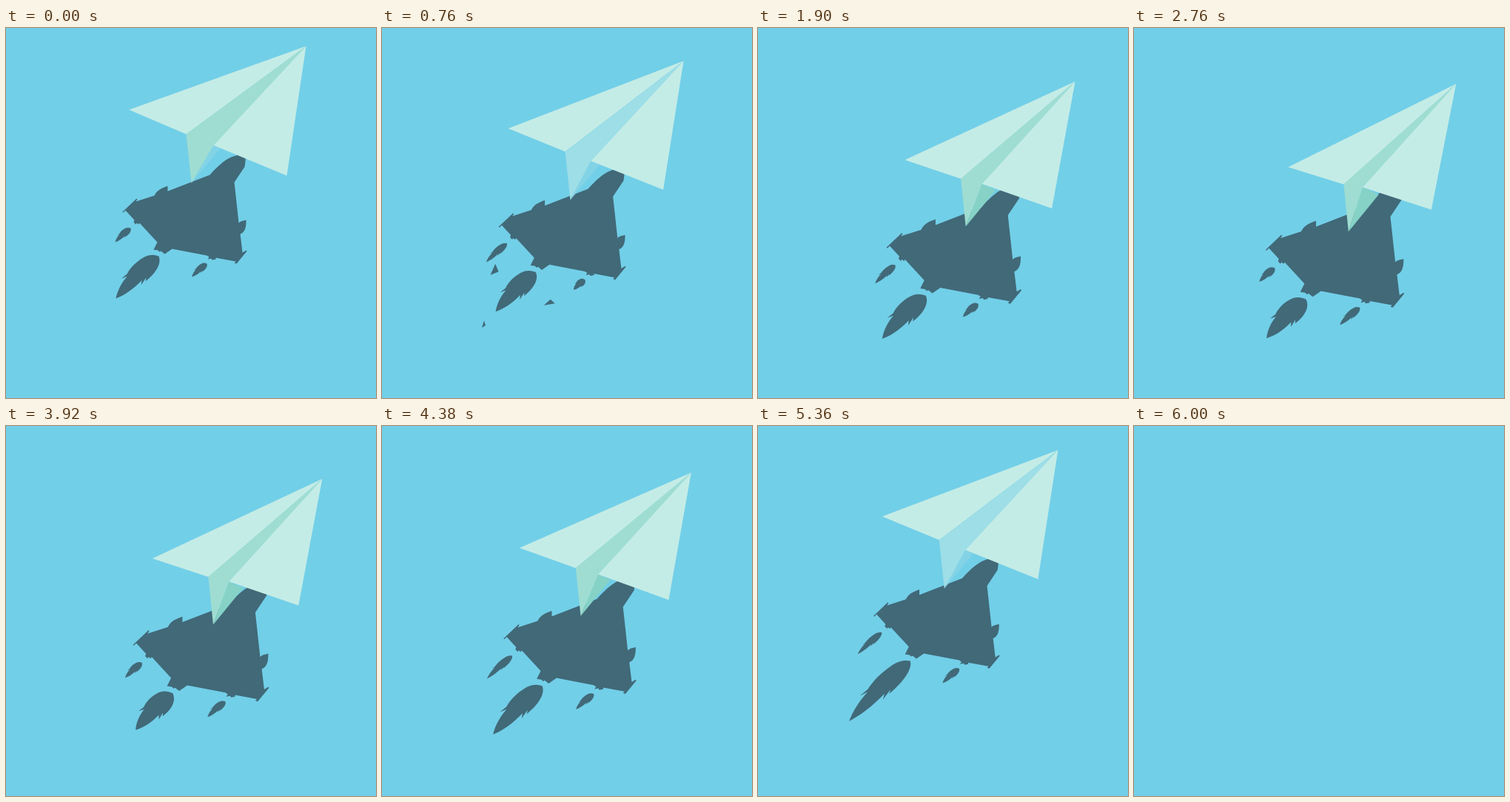
Recreate the animation shown at these times as an HTML page. Size 500 by 500 pixels, loop 6020 ms.

```html
<!DOCTYPE html>
<html lang="en">
<head>
<meta charset="utf-8">
<title>Paper plane</title>
<style>
  html, body { margin: 0; width: 100%; height: 100%; overflow: hidden; background: #72cfe8; }
  svg { display: block; width: 100vw; height: 100vh; }
</style>
</head>
<body>
<svg viewBox="0 0 500 500">
  <g id="scene">
    <g id="shadow" fill="#416978">
      <path id="ship" d="M0 0 L19 -18 L20 -17 L18 -14 L43 -22 C47 -30 53 -32 61 -35 L61 -28
        L118 -50 C132 -65 145 -78 165 -77 C167 -74 166 -68 165 -61 L151 -40 L157 15
        C160 12 163 12 167 11 C167 20 166 27 159 30 L162 55 L167 52 L168 53 L154 70 L151 69 L153 67
        L126 62 L126 64 L121 65 L120 63 L115 64 L117 61 L114 59 L67 50 L57 57 L52 53 L50 54 L48 52
        L42 51 L47 41 L23 15 L22 17 L19 15 L18 17 L15 14 L16 11 L4 -2 L1 1 Z"/>
    </g>
    <g id="debris" fill="#416978"></g>
    <polygon id="farKeel"/>
    <polygon id="leftWing" fill="#c4ece6"/>
    <polygon id="keel"/>
    <polygon id="rightWing" fill="#c4ece6"/>
  </g>
</svg>
<script>
const LOOP = 6020, BLANK_AT = 6000;
const FLAME = 'M0 0 C3 7 9 12 17 13.5 C27 16 38 16 47 13 L57 14 L49 10.5 C60 10 72 6 81 0 C70 -5 56 -7.5 39 -7 L44 -11 L32 -8.5 L36 -11.5 C24 -13 5 -12 0 0Z';
const FLAME_LENGTH = 81;
const { cos, sin, PI } = Math;
const $ = id => document.getElementById(id);

function add(parent, tag, attrs) {
  const node = document.createElementNS('http://www.w3.org/2000/svg', tag);
  for (const key in attrs) node.setAttribute(key, attrs[key]);
  return parent.appendChild(node);
}

// Paper corners relative to the nose: x, y, then their drift as the plane rolls.
const corners = {
  nose: [0, 0, 0, 0],
  left: [-239.3, 86, 12.5, 27],
  fold: [-162, 119, 10.3, 17],
  keelTip: [-155, 185, 9.7, 15],
  joint: [-125, 134, -1.2, 6],
  far: [-116, 138, 11.5, 12],
  right: [-26, 175, -7.5, -5]
};
const faces = {
  farKeel: ['joint', 'far', 'keelTip'],
  leftWing: ['left', 'nose', 'fold'],
  keel: ['fold', 'nose', 'joint', 'keelTip'],
  rightWing: ['joint', 'nose', 'right']
};

const flameTimes = [0, 760, 1900, 2760, 3920, 4800, 6000];
const flames = [
  { x: 11, y: 22, angle: 138, width: .36, wave: 5, sway: 4, lengths: [28, 37, 34, 25, 28, 49, 28] },
  { x: 49, y: 60, angle: 135.5, width: 1, wave: 6, sway: 17, lengths: [81, 74, 76, 67, 64, 121, 84] },
  { x: 114, y: 70, angle: 139, width: .36, wave: 7, sway: 4, lengths: [27, 20, 25, 32, 29, 37, 27] }
];
for (const flame of flames) flame.node = add($('shadow'), 'path', { d: FLAME });

// Birth time, position, width, height.
const sparks = [
  [720, 158, 321, 11, 15], [700, 235, 363, 15, 8], [640, 155, 385, 5, 10],
  [960, 142, 396, 12, 13], [1140, 146, 407, 11, 14], [1300, 148, 413, 10, 12]
].map(([birth, x, y, w, h]) => ({
  birth, x, y,
  node: add($('debris'), 'path', { d: `M${w * .1} ${-h / 2} L${w / 2} ${h * .2} L${-w / 2} ${h / 2}Z` })
}));

// Eases between the key lengths; the flicker dies out at each key.
function flameLength({ lengths, wave, sway }, t) {
  let i = 0;
  while (i < flameTimes.length - 2 && t >= flameTimes[i + 1]) i++;
  const f = (t - flameTimes[i]) / (flameTimes[i + 1] - flameTimes[i]);
  const ease = (1 - cos(PI * f)) / 2;
  return lengths[i] + (lengths[i + 1] - lengths[i]) * ease + sway * sin(PI * wave * f);
}

function draw(t) {
  $('scene').style.display = t < BLANK_AT ? '' : 'none';
  const a = t / 1000 + .27;
  const roll = (1 - cos(t / 1000 + .155)) / 2;
  const noseX = 418.5 - 16.4 * cos(a) + 2 * cos(2 * a) + 1.6 * cos(3 * a);
  const noseY = 55.2 - 26.4 * cos(a) - 6.2 * cos(2 * a);

  for (const id in faces) {
    const points = faces[id].map(name => {
      const [x, y, dx, dy] = corners[name];
      return [noseX + x + dx * roll, noseY + y + dy * roll].map(v => v.toFixed(2)).join();
    });
    $(id).setAttribute('points', points.join(' '));
  }
  const tinted = roll > .08 && roll < .5;
  $('keel').setAttribute('fill', tinted ? '#9ddee7' : '#9fddd2');
  $('farKeel').setAttribute('fill', roll < .5 ? '#83d3e6' : '#86d2c7');

  $('shadow').setAttribute('transform',
    `translate(${noseX - 248 - 9.5 * roll} ${noseY + 224 + .3 * roll}) scale(${1 + .118 * roll})`);
  for (const flame of flames) {
    const stretch = flameLength(flame, t) / FLAME_LENGTH;
    flame.node.setAttribute('transform',
      `translate(${flame.x} ${flame.y}) rotate(${flame.angle}) scale(${stretch} ${flame.width})`);
  }
  for (const { birth, x, y, node } of sparks) {
    const age = (t - birth) / 1000;
    const size = age < 0 ? 0 : Math.max(0, 1 - Math.max(0, age - .12) / .42);
    node.setAttribute('transform', `translate(${x - 145 * age} ${y + 125 * age}) scale(${size})`);
  }
}

const start = performance.now();
function tick() {
  draw((performance.now() - start) % LOOP);
  requestAnimationFrame(tick);
}
tick();
</script>
</body>
</html>
```
